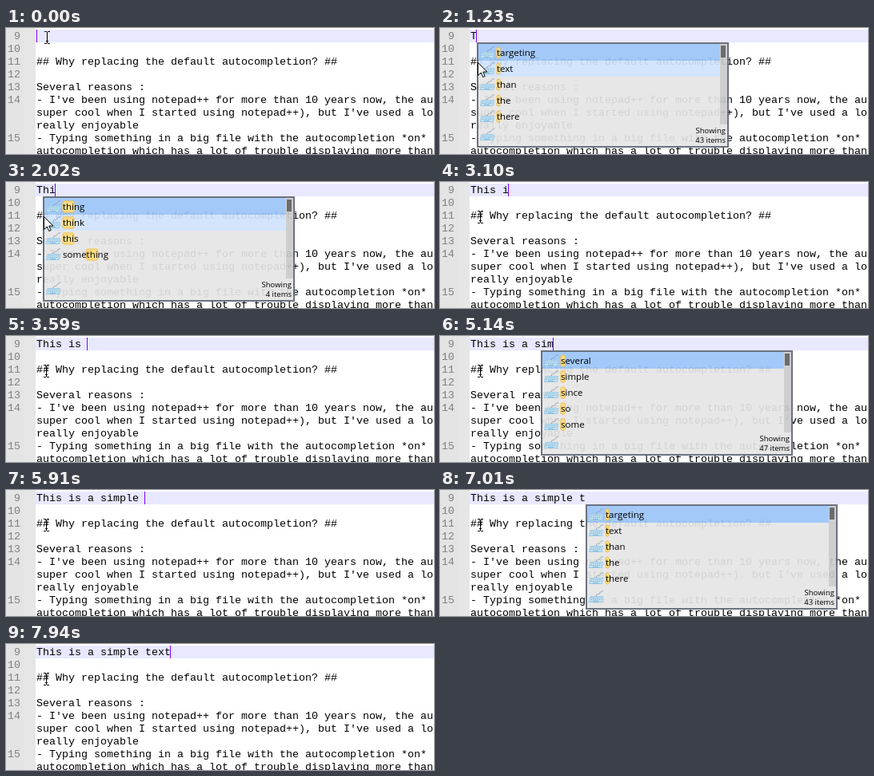
Animation, 535 px wide and 158 px high, one loop 8000 ms. Source, as an HTML page:

```html
<!DOCTYPE html>
<html lang="en">
<head>
<meta charset="utf-8">
<title>Editor autocompletion</title>
<style>
  html, body { margin: 0; width: 100%; height: 100%; overflow: hidden; background: #fff; }
  svg { display: block; width: 535px; height: 158px; }
  text { white-space: pre; }
  .code { font: 13.333px "Liberation Mono", "Courier New", monospace; }
  .num { fill: #808080; }
  .item { font: 11.5px "Open Sans", "Noto Sans", sans-serif; fill: #000; }
  .note { font: 9.5px "Open Sans", "Noto Sans", sans-serif; fill: #000; text-anchor: end; }
  .crisp { shape-rendering: crispEdges; }
</style>
</head>
<body>
<svg id="stage" viewBox="0 0 535 158" xmlns="http://www.w3.org/2000/svg">
  <defs>
    <g id="keyboard">
      <path d="M9 8C9 4 13 7 14 4S17 3 18 1" fill="none" stroke="#8fa3b2"/>
      <path d="M2 8.5H17.5L16.5 15.5H.5Z" fill="#c4e2f3" stroke="#9ac8e4"/>
      <path d="M3 10.5H16M2.5 12.5H15.5" stroke="#7fb4d6" stroke-dasharray="1.5 1"/>
      <path d="M5 14.3H12" stroke="#7fb4d6"/>
    </g>
  </defs>
  <rect width="535" height="158" fill="#fff"/>
  <rect width="22" height="158" fill="#e4e4e4"/>
  <rect x="22" width="15" height="158" fill="#e6e6e6"/>
  <rect x="37" y="2" width="498" height="16" fill="#e8e8ff"/>
  <g id="page"></g>
  <text id="typed" class="code" x="38" y="14"></text>
  <rect id="caret" class="crisp" y="2" width="1" height="16" fill="#8000ff"/>
  <g id="popup"></g>
  <path id="beam" class="crisp" fill="none" stroke="#000"
        d="M48 4.5h3m1 0h3M51.5 5v14M48 19.5h3m1 0h3M50 16.5h3"/>
  <path id="arrow" fill="#fff" stroke="#000"
        d="M47.5 43.5V59.5L51.3 56L53.8 61.5L56.2 60.5L53.8 55H59Z"/>
</svg>
<script>
const LOOP = 8000, LEFT = 38, CHAR = 8, ROW = 16;
const $ = id => document.getElementById(id);

function add(parent, tag, attrs, content) {
  const el = document.createElementNS("http://www.w3.org/2000/svg", tag);
  for (const key in attrs) el.setAttribute(key, attrs[key]);
  if (content !== undefined) el.textContent = content;
  parent.appendChild(el);
  return el;
}

// Line number and text of each visual row; wrapped rows have no number.
const lines = [
  ["9", ""],
  ["10", ""],
  ["11", "## Why replacing the default autocompletion? ##"],
  ["12", ""],
  ["13", "Several reasons :"],
  ["14", "- I've been using notepad++ for more than 10 years now, the au"],
  ["", "super cool when I started using notepad++), but I've used a lo"],
  ["", "really enjoyable"],
  ["15", "- Typing something in a big file with the autocompletion *on* "],
  ["", "autocompletion which has a lot of trouble displaying more than"]
];
lines.forEach(([num, text], i) => {
  const y = 14 + i * ROW;
  add($("page"), "text", { class: "code num", x: 18 - num.length * CHAR, y }, num);
  add($("page"), "text", { class: "code", x: LEFT, y }, text);
});

// Suggestions by typed prefix, with the total shown in the footer.
const lists = {
  t:   [43, "targeting", "text", "than", "the", "there"],
  th:  [14, "than", "the", "there", "they", "this"],
  thi: [4, "thing", "think", "this", "something"],
  i:   [52, "if", "in", "is", "it", "items"],
  a:   [61, "a", "about", "after", "all", "also"],
  s:   [47, "several", "simple", "since", "so", "some"],
  sim: [2, "simple", "simply"],
  te:  [9, "text", "started", "notepad", "completed", "updated"]
};

// Time, typed text, caret shown, suggestion prefix, column of the popup.
const steps = [
  [0, "", 1],
  [460, "", 0],
  [760, "", 1],
  [1080, "T", 1],
  [1230, "T", 1, "t", 1],
  [1550, "Th", 1, "t", 1],
  [1710, "Th", 1, "th", 1],
  [1860, "Thi", 1, "th", 1],
  [2020, "Thi", 1, "thi", 1],
  [2170, "This", 1],
  [2500, "This", 0],
  [2650, "This", 1],
  [2950, "This ", 1],
  [3100, "This i", 1],
  [3270, "This i", 1, "i", 6],
  [3430, "This is", 1, "i", 6],
  [3590, "This is ", 1],
  [3910, "This is a", 1],
  [4040, "This is a", 1, "a", 9],
  [4370, "This is a ", 1],
  [4520, "This is a s", 1],
  [4680, "This is a s", 1, "s", 11],
  [4830, "This is a s", 0, "s", 11],
  [5140, "This is a sim", 1, "s", 11],
  [5300, "This is a sim", 1, "sim", 11],
  [5450, "This is a simple ", 1],
  [5610, "This is a simple ", 0],
  [5910, "This is a simple ", 1],
  [6210, "This is a simple t", 1],
  [6370, "This is a simple t", 1, "t", 18],
  [6530, "This is a simple t", 0, "t", 18],
  [6840, "This is a simple t", 1, "t", 18],
  [7010, "This is a simple t", 0, "t", 18],
  [7330, "This is a simple te", 1, "t", 18],
  [7460, "This is a simple te", 1, "te", 18],
  [7780, "This is a simple text", 0],
  [7940, "This is a simple text", 1]
];

// Time and offset of the mouse pointer.
const pointer = [[0, 0, 0], [150, 0, 9], [310, -1, 24], [460, -1, 32]];

const current = (list, time) => list.findLast(entry => entry[0] <= time);

function drawPopup(prefix, column) {
  const box = $("popup");
  box.replaceChildren();
  if (!prefix) return;
  const [total, ...words] = lists[prefix];
  box.setAttribute("transform", `translate(${LEFT + column * CHAR} 18)`);

  // The panel lets the page shine through; its labels are solid.
  const panel = add(box, "g", { opacity: 0.92 });
  const rect = (x, y, width, height, fill) =>
    add(panel, "rect", { x, y, width, height, fill });
  rect(0, 0, 315, 132, "#5f6876");
  rect(2, 2, 311, 128, "#e5e5e5");
  rect(2, 2, 302, 21, "#9cc5f8");
  if (column === 1) rect(2, 23, 302, 20, "#d0e3fc");
  rect(304, 2, 9, 101, "#cacaca");
  rect(305, 4, 6, 15, "#606060");

  words.forEach((word, i) => {
    const y = 3 + i * 20;
    add(box, "use", { href: "#keyboard", x: 4, y: y + 1 });
    const mark = add(box, "rect", {
      x: 25, y: y + 3, width: 4, height: 14, rx: 2, fill: "#ffdc85", stroke: "#f2bd45"
    });
    const label = add(box, "text", { class: "item", x: 25, y: y + 14 }, word);
    const start = word.indexOf(prefix);
    if (start < 0) {
      mark.remove();
    } else {
      mark.setAttribute("x", 25 + (start ? label.getSubStringLength(0, start) : 0));
      mark.setAttribute("width", label.getSubStringLength(start, prefix.length));
    }
  });

  add(box, "use", { href: "#keyboard", x: 4, y: 107 });
  add(box, "text", { class: "note", x: 311, y: 114 }, "Showing");
  add(box, "text", { class: "note", x: 311, y: 126 }, total + " items");
}

let shown = "";
function draw(time) {
  const [, text, caretOn, prefix, column] = current(steps, time);
  const [, dx, dy] = current(pointer, time);
  const overPopup = column === 1;

  $("typed").textContent = text;
  $("caret").setAttribute("x", text ? LEFT - 1 + text.length * CHAR : LEFT);
  $("caret").setAttribute("visibility", caretOn ? "visible" : "hidden");
  $("beam").setAttribute("transform", `translate(${dx} ${dy})`);
  $("beam").setAttribute("visibility", overPopup ? "hidden" : "visible");
  $("arrow").setAttribute("visibility", overPopup ? "visible" : "hidden");

  const key = prefix + "/" + column;
  if (key !== shown) {
    drawPopup(prefix, column);
    shown = key;
  }
}

const begin = performance.now();
function tick() {
  draw((performance.now() - begin) % LOOP);
  requestAnimationFrame(tick);
}
tick();
</script>
</body>
</html>
```
